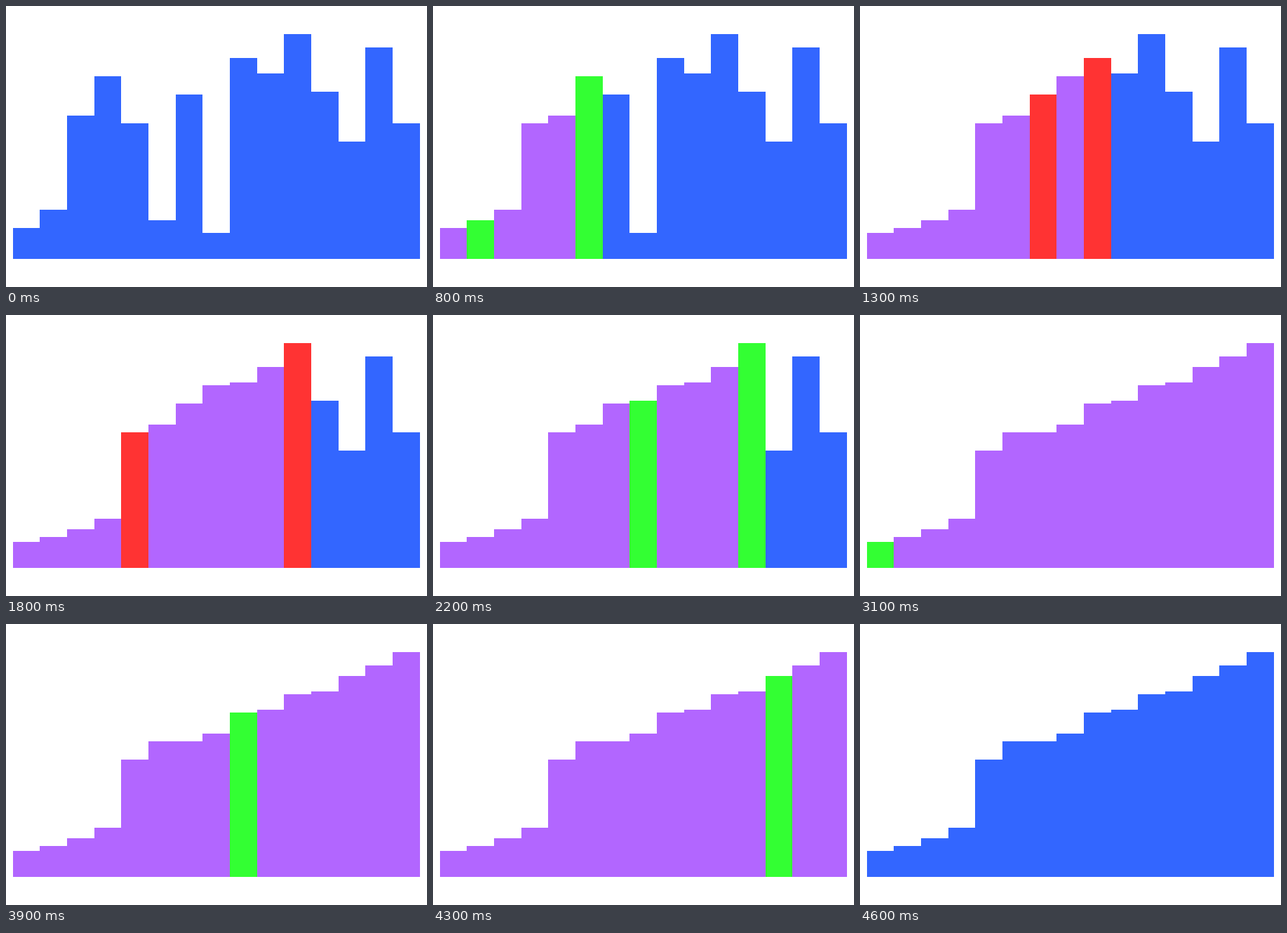
These frames come from a looping animation (600x400 px, 4.7 s). An HTML page with a canvas:

```html
<!DOCTYPE html>
<html>
<head>
<meta charset="utf-8">
<style>
html, body { margin: 0; width: 100%; height: 100%; overflow: hidden; background: #fff; }
canvas { display: block; }
</style>
</head>
<body>
<canvas id="stage" width="600" height="400"></canvas>
<script>
const ctx = document.getElementById('stage').getContext('2d');
const BLUE = '#3366ff', PURPLE = '#b266ff', GREEN = '#33ff33', RED = '#ff3333';
const STEP = 100, BASE = 360, COMPARES_PER_STEP = 5;
const bars = [44, 70, 204, 260, 193, 55, 234, 37, 286, 264, 320, 238, 167, 301, 193];
const n = bars.length;
const steps = [];

function record(sorted = 0, color = BLUE, marked = []) {
  steps.push({ bars: [...bars], sorted, color, marked });
}

// Insertion sort scanning from the left; every insert is shown, but only each fifth comparison.
function sort() {
  let compares = 0;
  record();
  for (let i = 0; i < n; i++) {
    let j = 0;
    for (; j < i; j++) {
      if (++compares % COMPARES_PER_STEP === 0) record(i, RED, [j, i]);
      if (bars[j] > bars[i]) break;
    }
    bars.splice(j, 0, bars.splice(i, 1)[0]);
    record(i + 1, GREEN, [j, i]);
  }
  for (let i = 0; i < n; i++) record(n, GREEN, [i]);
  record();
}

const edge = i => Math.floor(10 + i * 580 / n);

function draw({ bars, sorted, color, marked }) {
  ctx.fillStyle = '#fff';
  ctx.fillRect(0, 0, 600, 400);
  bars.forEach((h, i) => {
    ctx.fillStyle = marked.includes(i) ? color : i < sorted ? PURPLE : BLUE;
    ctx.fillRect(edge(i), BASE - h, edge(i + 1) - edge(i), h);
  });
}

function tick() {
  draw(steps[Math.floor(performance.now() / STEP) % steps.length]);
  requestAnimationFrame(tick);
}

sort();
tick();
</script>
</body>
</html>
```
